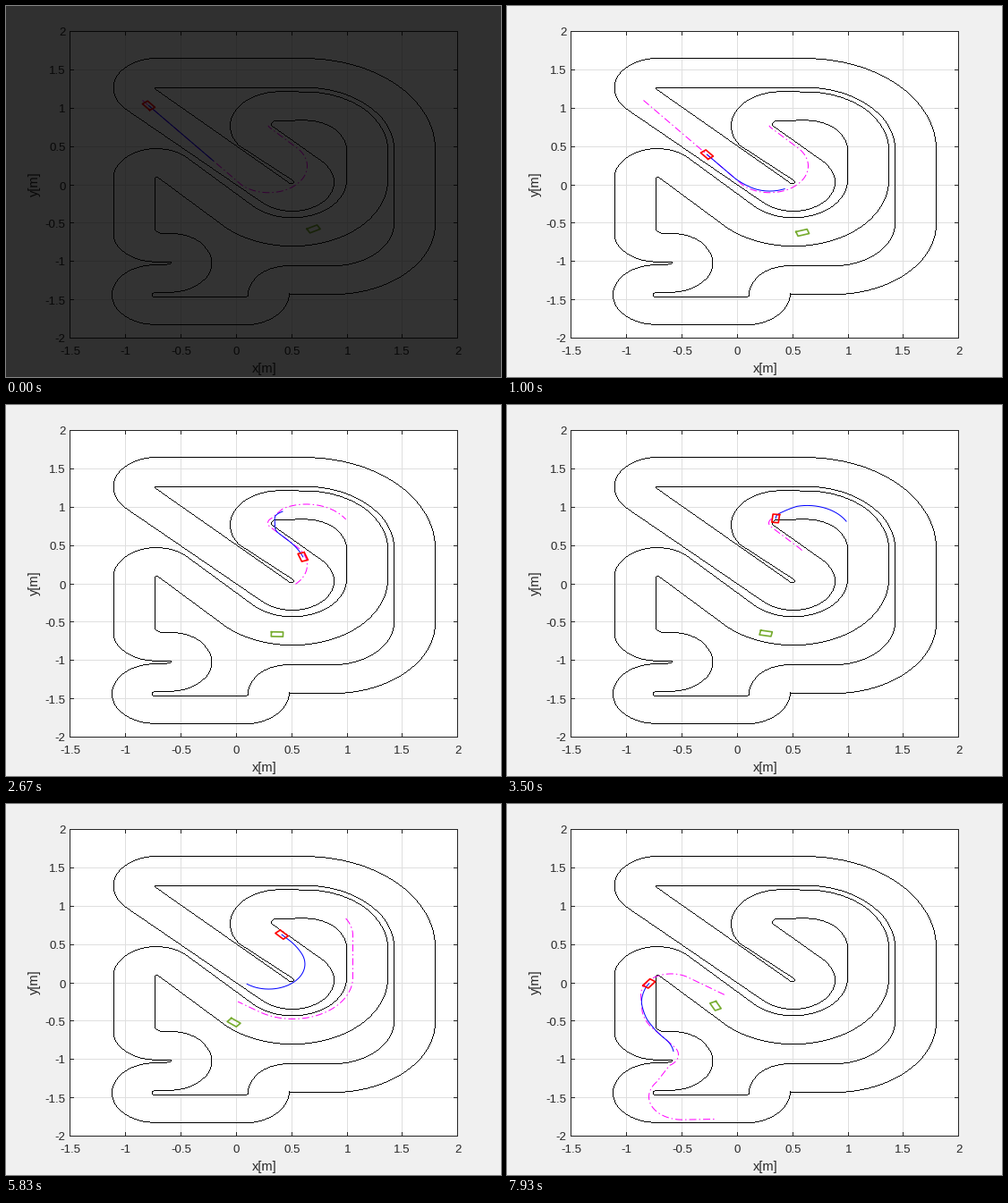
A matplotlib script that plays this animation: 553x415 px, repeating every 8 s.

```python
import matplotlib.pyplot as plt
import numpy as np
from matplotlib.animation import FuncAnimation
from matplotlib.patches import Rectangle

W, H, DPI = 553, 415, 100
PT = 72 / DPI                              # points per pixel
LEFT, RIGHT, TOP, BOTTOM = 71, 504, 28, 371
UNIT = np.array([433 / 3.5, 343 / 4])      # pixels per metre
INK, GREEN = "#262626", "#77AC30"
STEP, FRAMES, HOLD = 20, 400, 3            # ms, frames, frames per pose

plt.rcParams.update({"font.family": "Liberation Sans", "path.snap": False})


def arc(cx, cy, r, a0, a1):
    """Circle in metric space, seen in pixels; angles in degrees."""
    a = np.radians(np.linspace(a0, a1, 60))
    return np.column_stack([cx + r * np.cos(a),
                            cy - r * UNIT[1] / UNIT[0] * np.sin(a)])


def closed(*parts):
    pts = np.vstack(parts)
    return np.vstack([pts, pts[:1]])


OUTER = closed(
    arc(333, 159.4, 146, 90, 0), arc(365, 243, 114, 0, -90), [[316, 322]],
    arc(265, 321, 51, 0, -90), arc(166, 322.5, 48, -90, -270),
    arc(182, 287, 2, -90, 90), arc(166, 253.4, 46.5, -90, -180),
    arc(167, 192, 47.5, 180, 45), arc(319, 194, 61, -135, 0),
    arc(333, 160, 47, 0, 90), arc(302, 131.8, 6, 90, 225),
    arc(319, 196.4, 47, 45, -135), arc(168, 91.6, 48.5, 225, 90))

INNER = closed(
    arc(333, 160, 100, 90, 0), arc(365, 243, 68, 0, -90),
    arc(316, 322, 46, 90, 180), arc(267.5, 322.9, 3, 0, -90),
    arc(166, 322.6, 3.5, -90, -270), arc(182, 286.8, 47.5, -90, 90),
    arc(174, 248.3, 8, -90, -180), arc(167.3, 192, 1.8, 180, 45),
    arc(319, 194, 107, -135, 0), arc(333, 160, 93, 0, 90),
    arc(305, 133.5, 55, 90, 215), arc(318, 196, 3, 45, -135),
    arc(167.5, 91.7, 1.7, 225, 90))

# Ideal line of the red car through the lane.
ROUTE = np.vstack([
    [[152, 105]], arc(293, 178.5, 43, -135, 45), arc(301, 131.5, 9, 225, 125),
    arc(335, 146.5, 52, 120, 0), arc(320, 193.5, 67, 0, -125),
    arc(183, 213, 34, 60, 180), arc(207, 226, 57, 180, 225),
    arc(171, 280, 20, 45, -60), arc(195, 327, 37, 140, 270), [[232, 352]]])
DIST = np.r_[0, np.cumsum(np.hypot(*(np.diff(ROUTE, axis=0) / UNIT).T))]

# Time in ms at which the red car passes a point of its line.
PASSES = [(40, 152, 105), (1850, 298, 207), (3500, 300, 123),
          (4770, 387, 154), (6890, 243, 211), (7930, 156, 196),
          (10400, 232, 352)]
PASS_TIME = [t for t, _, _ in PASSES]
PASS_DIST = [DIST[np.argmin(np.hypot(*(ROUTE - p).T))] for _, *p in PASSES]

# Time span covered by each plan; it is valid from its first moment.
PLANS = [(40, 3380), (2150, 4960), (3490, 6080), (4960, 7750),
         (6150, 8950), (7780, 10400)]
LOOK_AHEAD = 1000
WARN = (6600, 7300)
MARKS = ["black", "red", "magenta", "lime"]


def travelled(t):
    return np.interp(t, PASS_TIME, PASS_DIST)


def on_route(s):
    return np.column_stack([np.interp(s, DIST, c) for c in ROUTE.T])


def driven(s, cut=.12):
    """The car cuts the bends a little inside the ideal line."""
    s = np.atleast_1d(s)
    return (on_route(s - cut) + on_route(s + cut)) / 2


def stretch(curve, t0, t1):
    return curve(np.linspace(travelled(t0), travelled(t1), 150))


def red_pose(t):
    back, pos, front = driven(travelled(t) + np.array([-.04, 0, .04]))
    return pos, front - back


def green_pose(t):
    angle = -59.6 - .0118 * t
    pos, front = arc(304, 200.5, 80, angle, angle - 1)[[0, -1]]
    return pos, front - pos


def axes_of(direction):
    d = direction / UNIT
    d = d / np.hypot(*d)
    return d, np.array([-d[1], d[0]])


def car_box(pos, direction):
    d, n = axes_of(direction)
    return closed([pos + (a * .053 * d + b * .03 * n) * UNIT
                   for a, b in [(1, 1), (1, -1), (-1, -1), (-1, 1)]])


fig = plt.figure(figsize=(W / DPI, H / DPI), dpi=DPI, facecolor="#f0f0f0")
ax = fig.add_axes([0, 0, 1, 1])
ax.set_xlim(-.5, W - .5)
ax.set_ylim(H - .5, -.5)
ax.axis("off")


def line(x, y, color, width=1.0, **kw):
    return ax.plot(x, y, color=color, lw=width * PT, **kw)[0]


def hard_line(pts, color):
    """Stepped line of whole pixels, without smoothing."""
    s = np.r_[0, np.cumsum(np.abs(np.diff(pts, axis=0)).max(axis=1))]
    x, y = (np.round(np.interp(np.arange(s[-1]), s, c)) for c in pts.T)
    gap = np.full_like(x, np.nan)
    line(np.column_stack([x - .5, x + .5, gap]).ravel(),
         np.column_stack([y, y, gap]).ravel(), color,
         solid_capstyle="butt")


def label(x, y, text, size, **kw):
    ax.text(x, y, text, fontsize=size * PT, color=INK, **kw)


def draw_axes():
    ax.add_patch(Rectangle((LEFT, TOP), RIGHT - LEFT, BOTTOM - TOP,
                           fc="white", ec="none"))
    xs = [(v, round(LEFT + .3 + (v + 1.5) * UNIT[0]))
          for v in np.arange(-1.5, 2.1, .5)]
    ys = [(v, round(TOP + (2 - v) * UNIT[1])) for v in np.arange(-2, 2.1, .5)]
    for v, x in xs:
        line([x, x], [TOP, BOTTOM], "#dfdfdf")
        label(x, 389, f"{v:g}", 13.3, ha="center", va="baseline")
    for v, y in ys:
        line([LEFT, RIGHT], [y, y], "#dfdfdf")
        label(66, y + 5, f"{v:g}", 13.3, ha="right", va="baseline")
    for _, x in xs:
        line([x, x], [TOP, TOP + 4], INK)
        line([x, x], [BOTTOM - 4, BOTTOM], INK)
    for _, y in ys:
        line([LEFT, LEFT + 4], [y, y], INK)
        line([RIGHT - 4, RIGHT], [y, y], INK)
    line([LEFT, RIGHT, RIGHT, LEFT, LEFT], [TOP, TOP, BOTTOM, BOTTOM, TOP], INK)
    label(288, 405, "x[m]", 14.7, ha="center", va="center")
    label(31, 199, "y[m]", 14.7, ha="center", va="center", rotation=90)


draw_axes()
for wall in (OUTER, INNER):
    hard_line(wall, "black")

plan_line = line([], [], "magenta", ls=(0, (8, 3, 1.5, 3)),
                 dash_capstyle="butt")
ahead_line = line([], [], "blue")
green_car = line([], [], GREEN, 1.7)
warn_box = line([], [], "black")
warn_marks = [line([], [], c, marker=(8, 2, 0), ms=8 * PT, mew=PT)
              for c in MARKS]
red_car = line([], [], "red", 1.7)
shade = ax.add_patch(Rectangle((-1, -1), W + 2, H + 2, fc="black", ec="none",
                               alpha=.8, zorder=10))


def update(i):
    t = max(100, STEP * (HOLD * (i // HOLD) + HOLD / 2))
    shade.set_visible(i * STEP < 100)

    plan = [p for p in PLANS if p[0] <= t][-1]
    plan_line.set_data(*stretch(on_route, *plan).T)
    ahead_line.set_data(*stretch(driven, t, t + LOOK_AHEAD).T)
    red_car.set_data(*car_box(*red_pose(t)).T)

    pos, direction = green_pose(t)
    box = car_box(pos, direction)
    green_car.set_data(*box.T)
    warn_box.set_data(*box.T)
    warning = WARN[0] <= t < WARN[1]
    warn_box.set_visible(warning)
    ahead, _ = axes_of(direction)
    for mark, offset in zip(warn_marks, np.linspace(.105, -.105, len(MARKS))):
        x, y = pos + offset * ahead * UNIT
        mark.set_data([x], [y])
        mark.set_visible(warning)
    return []


anim = FuncAnimation(fig, update, frames=FRAMES, interval=STEP,
                     init_func=lambda: update(0), repeat=True, repeat_delay=0)
plt.show()
```
